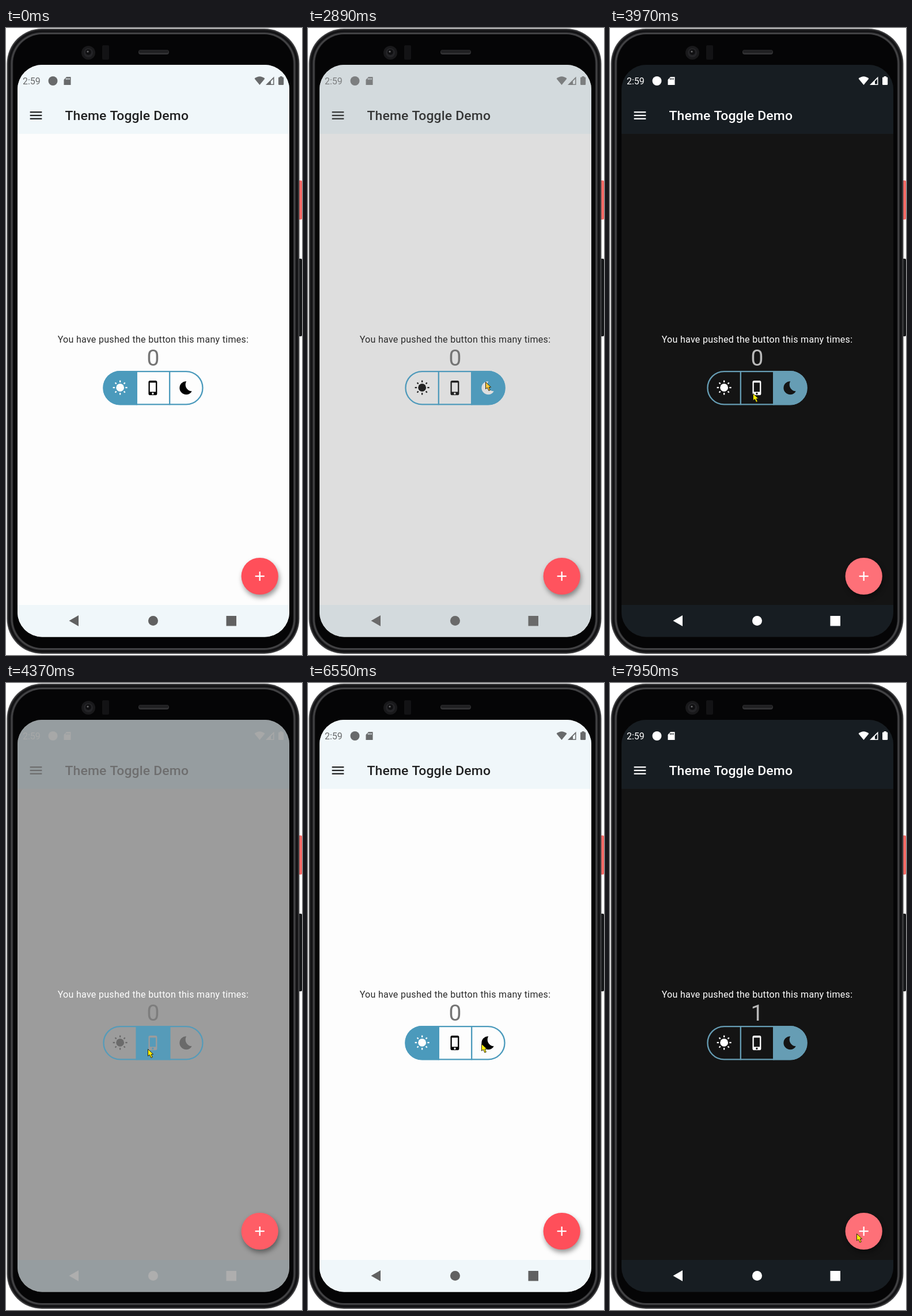
These frames come from a looping animation (514 px wide and 1090 px high, 8 s). An HTML page with a canvas:

```html
<!DOCTYPE html>
<html lang="en">
<head>
<meta charset="utf-8">
<title>Theme Toggle Demo</title>
<style>
  html, body { margin: 0; width: 100%; height: 100%; overflow: hidden; background: #fff; }
  canvas { display: block; width: 100%; height: 100%; }
</style>
</head>
<body>
<canvas id="stage" width="514" height="1090"></canvas>
<script>
const ctx = document.getElementById('stage').getContext('2d');
const LOOP = 8000, STEP = 77.94, FADE = 200, DP = 1.147;
const MID = { x: 255.5, y: 625.7 };

// Each press selects a button; body text only fades once the theme has settled.
const presses = [
  { at: 2857, textAt: 3020, button: 2, dark: 1 },
  { at: 4170, textAt: 4626, button: 1, dark: 0 },
  { at: 5840, textAt: 5840, button: 0, dark: 0 },
  { at: 6832, textAt: 7000, button: 2, dark: 1 }
];
const COUNT_AT = 7700;

const cursorMoves = [
  { from: 1080, to: 1700, x: 308, y: 611 },
  { from: 2100, to: 2200, x: 308, y: 615 },
  { from: 3510, to: 3980, x: 246, y: 636 },
  { from: 5220, to: 5450, x: 211, y: 634 },
  { from: 5560, to: 5700, x: 198, y: 632 },
  { from: 5930, to: 6540, x: 301, y: 627 },
  { from: 7090, to: 7430, x: 428, y: 957 }
];

// Light and dark colours with alpha.
const palette = {
  bg: ['fdfdfdff', '141414ff'],
  bar: ['f0f7faff', '171d22ff'],
  title: ['000000dd', 'ffffffff'],
  icon: ['000000ff', 'ffffffff'],
  count: ['0000008a', 'ffffffb3'],
  text: ['2b2b2bff', 'ffffffff'],
  status: ['686a6bff', 'ffffffff'],
  nav: ['616161ff', 'ffffffff'],
  accent: ['4b9abcff', '669db4ff'],
  fab: ['ff4f5aff', 'fe7078ff']
};

const ramp = (t, from, length) => Math.max(0, Math.min(1, (t - from) / length));
const lerp = (a, b, k) => a + (b - a) * k;
const easeOut = k => 1 - (1 - k) ** 2;

function mix(name, k) {
  const [a, b] = palette[name].map(hex => hex.match(/../g).map(v => parseInt(v, 16)));
  const [r, g, bl, alpha] = a.map((v, i) => lerp(v, b[i], k));
  return `rgba(${Math.round(r)},${Math.round(g)},${Math.round(bl)},${alpha / 255})`;
}

function fade(t, key, delay = 0) {
  return presses.reduce((k, p) => lerp(k, p.dark, ramp(t, p[key] + delay, FADE)), 0);
}

function rect(x, y, w, h, color) {
  ctx.fillStyle = color;
  ctx.fillRect(x, y, w, h);
}

function pill(x, y, w, h, r, color) {
  ctx.beginPath();
  ctx.roundRect(x, y, w, h, r);
  ctx.fillStyle = color;
  ctx.fill();
}

function dot(x, y, r, color) {
  ctx.fillStyle = color;
  ctx.beginPath();
  ctx.arc(x, y, r, 0, Math.PI * 2);
  ctx.fill();
}

function poly(points, color) {
  ctx.fillStyle = color;
  ctx.beginPath();
  for (const [x, y] of points) ctx.lineTo(x, y);
  ctx.closePath();
  ctx.fill();
}

function label(text, x, y, size, color, { weight = 400, spacing = 0, align = 'left' } = {}) {
  ctx.font = `${weight} ${size}px Roboto, sans-serif`;
  ctx.letterSpacing = spacing + 'px';
  ctx.textAlign = align;
  ctx.fillStyle = color;
  ctx.fillText(text, x, y);
}

function drawBody() {
  rect(0, 0, 514, 1090, '#fff');
  pill(506, 265, 8, 68, 2, '#f76a66');
  pill(506, 401, 8, 135, 2, '#151618');
  // Metal rim: nested outlines, bright at the edge and again at the glass.
  for (let i = 0; i < 12; i++) {
    const shade = Math.round(18 + 56 * Math.cos(i * Math.PI / 8) ** 4);
    pill(1.5 + i, 1 + i, 508 - 2 * i, 1087 - 2 * i, 61 - i, `rgb(${shade},${shade},${shade + 2})`);
  }
  pill(12.5, 11, 486, 1067, 51, '#050506');

  dot(143, 43, 12, '#19191b');
  dot(143, 43, 8, '#242427');
  dot(143, 42, 5, '#101012');
  dot(142, 41, 1.6, '#6a6a6c');
  pill(167, 30, 12, 25, 2, '#131315');
  pill(230, 38, 53, 8, 4, '#343436');
  pill(231, 38.5, 51, 5, 2.5, '#202022');
}

function drawStatus(color, back) {
  label('2:59', 29, 98, 16, color);
  dot(81.5, 92, 8, color);
  poly([[105, 85], [112.5, 85], [112.5, 99], [100.5, 99], [100.5, 90]], color);
  for (let i = 0; i < 3; i++) rect(104 + i * 2.6, 87, 1.2, 3, back);

  ctx.fillStyle = color;
  ctx.beginPath();
  ctx.moveTo(440.5, 99);
  ctx.lineTo(431.5, 88);
  ctx.quadraticCurveTo(440.5, 80.5, 449.5, 88);
  ctx.fill();

  poly([[465.5, 84.5], [465.5, 99], [451, 99]], color);
  poly([[464, 88.5], [464, 97.5], [460, 97.5], [460, 92.5]], back);
  rect(475.7, 84, 4, 2, color);
  pill(473, 85.5, 9.2, 13.5, 1.2, color);
}

// Icons are drawn around the origin on a 24-unit grid.
function sun(color) {
  dot(0, -.5, 6, color);
  for (let i = 0; i < 8; i++) {
    ctx.save();
    ctx.translate(0, -.5);
    ctx.rotate(i * Math.PI / 4);
    ctx.fillRect(-1, 8, 2, i % 2 ? 2.6 : 2.9);
    ctx.restore();
  }
}

function phone(color) {
  ctx.beginPath();
  ctx.roundRect(-7, -11, 13, 22, 2.5);
  ctx.rect(-5, -8, 9, 14);
  ctx.moveTo(1, 8.5);
  ctx.arc(-.5, 8.5, 1.5, 0, Math.PI * 2);
  ctx.fillStyle = color;
  ctx.fill('evenodd');
}

function moon(color) {
  ctx.beginPath();
  ctx.arc(0, 0, 10, -Math.PI / 2, Math.PI / 6, true);
  ctx.bezierCurveTo(1.15, 4.7, -3.4, -3.5, .3, -10);
  ctx.fillStyle = color;
  ctx.fill();
}

function drawToggle(selected, k) {
  const accent = mix('accent', k);
  const border = 2 * DP, cell = 48 * DP, pitch = cell + border;
  const w = 3 * pitch + border, h = cell + 2 * border;
  const x = MID.x - w / 2, y = MID.y - h / 2;
  ctx.save();
  ctx.beginPath();
  ctx.roundRect(x, y, w, h, h / 2);
  ctx.clip();
  rect(x + selected * pitch, y, pitch + border, h, accent);
  for (const i of [1, 2]) rect(x + i * pitch, y, border, h, accent);
  ctx.restore();

  ctx.strokeStyle = accent;
  ctx.lineWidth = border;
  ctx.beginPath();
  ctx.roundRect(x + border / 2, y + border / 2, w - border, h - border, h / 2);
  ctx.stroke();

  [sun, phone, moon].forEach((icon, i) => {
    ctx.save();
    ctx.translate(MID.x + (i - 1) * pitch, MID.y);
    ctx.scale(DP, DP);
    icon(mix(i === selected ? 'bg' : 'icon', k));
    ctx.restore();
  });
}

function drawFab(k) {
  const x = 440.7, y = 953, arm = 7 * DP;
  ctx.save();
  ctx.shadowColor = 'rgba(0,0,0,.4)';
  ctx.shadowBlur = 8;
  ctx.shadowOffsetX = 2;
  ctx.shadowOffsetY = 5;
  dot(x, y, 28 * DP, mix('fab', k));
  ctx.restore();
  rect(x - arm, y - DP, 2 * arm, 2 * DP, '#fff');
  rect(x - DP, y - arm, 2 * DP, 2 * arm, '#fff');
}

function drawCursor(t, fading) {
  if (t < cursorMoves[0].from) return;
  let x = 481, y = 817;
  for (const m of cursorMoves) {
    const k = easeOut(ramp(t, m.from, m.to - m.from));
    x = lerp(x, m.x, k);
    y = lerp(y, m.y, k);
  }
  ctx.save();
  ctx.translate(Math.round(x) + .5, Math.round(y) + .5);
  poly([[0, 0], [0, 12], [3, 9.7], [5.4, 15], [7.8, 14], [5.6, 9], [9.2, 8.8]], fading ? '#fbc93a' : '#fff200');
  ctx.strokeStyle = '#2c2810';
  ctx.lineWidth = 1;
  ctx.stroke();
  ctx.restore();
}

function draw(time) {
  // The app freezes for a moment in the middle of its second fade.
  const t = time > 4280 && time < 4670 ? 4287 : time;
  const k = fade(t, 'at'), textK = fade(t, 'textAt');
  const bar = mix('bar', k), title = mix('title', k), nav = mix('nav', fade(t, 'at', 15));
  const selected = presses.reduce((s, p) => t >= p.at ? p.button : s, 0);

  drawBody();
  ctx.save();
  ctx.beginPath();
  ctx.roundRect(20, 64, 472, 994.5, 43);
  ctx.clip();
  rect(20, 64, 472, 995, mix('bg', k));
  rect(20, 64, 472, 120, bar);
  rect(20, 1003, 472, 56, bar);
  drawStatus(mix('status', k), bar);

  for (const i of [-1, 0, 1]) rect(52 - 9 * DP, 152 + (5 * i - 1) * DP, 18 * DP, 2 * DP, title);
  label('Theme Toggle Demo', 102.4, 160, 20 * DP, title, { weight: 500, spacing: .17 });
  label('You have pushed the button this many times:', MID.x, 547, 14 * DP, mix('text', textK),
    { spacing: .25 * DP, align: 'center' });
  label(t < COUNT_AT ? '0' : '1', MID.x, 587, 34 * DP, mix('count', k), { spacing: .25 * DP, align: 'center' });
  drawToggle(selected, k);
  drawFab(k);

  poly([[109.5, 1030.5], [126, 1021], [126, 1040]], nav);
  dot(MID.x, 1030.5, 8.5, nav);
  rect(382.5, 1022, 17.5, 17.5, nav);
  ctx.restore();
  drawCursor(time, k > 0 && textK < 1);
}

const start = performance.now();
function frame() {
  const t = (performance.now() - start) % LOOP;
  draw(Math.floor(t / STEP) * STEP);
  requestAnimationFrame(frame);
}
frame();
</script>
</body>
</html>
```
